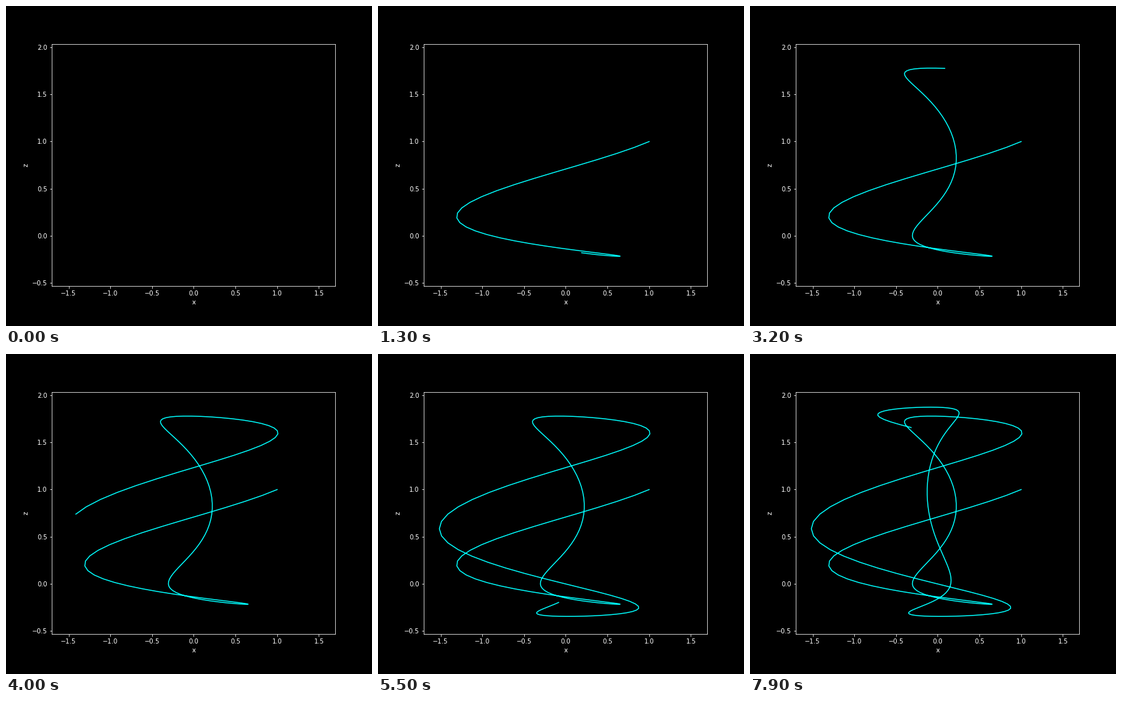
A matplotlib script that plays this animation: 576 px wide and 504 px high, repeating every 8000 ms.

```python
import numpy as np
import matplotlib.pyplot as plt
from matplotlib.animation import FuncAnimation

FRAMES, INTERVAL = 80, 100
STEP = 3           # points added per frame
DT, SUB = 0.05, 10  # spacing of points, integrator substeps


def aizawa(p, a=1.0, b=0.7, c=0.6, d=3.5, e=0.25, f=0.01):
    x, y, z = p
    return np.array([
        (z - b) * x - d * y,
        d * x + (z - b) * y,
        c + a * z - z**3 / 3 - (x**2 + y**2) * (1 + e * z) + f * z * x**3,
    ])


def rk4(p, h):
    k1 = aizawa(p)
    k2 = aizawa(p + h / 2 * k1)
    k3 = aizawa(p + h / 2 * k2)
    k4 = aizawa(p + h * k3)
    return p + h / 6 * (k1 + 2 * k2 + 2 * k3 + k4)


def trajectory(start, count):
    p = np.array(start, float)
    path = [p]
    for _ in range(count - 1):
        for _ in range(SUB):
            p = rk4(p, DT / SUB)
        path.append(p)
    return np.array(path)


path = trajectory((1, 1, 1), STEP * FRAMES)

plt.style.use("dark_background")
plt.rcParams.update({"font.family": "DejaVu Sans", "font.size": 10,
                     "figure.subplot.bottom": 0.125})

fig, ax = plt.subplots(figsize=(8, 7), dpi=72)
ax.set(xlim=(-1.702, 1.698), ylim=(-0.533, 2.031), xlabel="x", ylabel="z")
line, = ax.plot([], [], color="cyan", lw=1.5)


def update(i):
    shown = path[:STEP * i]
    line.set_data(shown[:, 0], shown[:, 2])
    return line,


anim = FuncAnimation(fig, update, frames=FRAMES, interval=INTERVAL,
                     repeat=True, repeat_delay=0)
plt.show()
```
